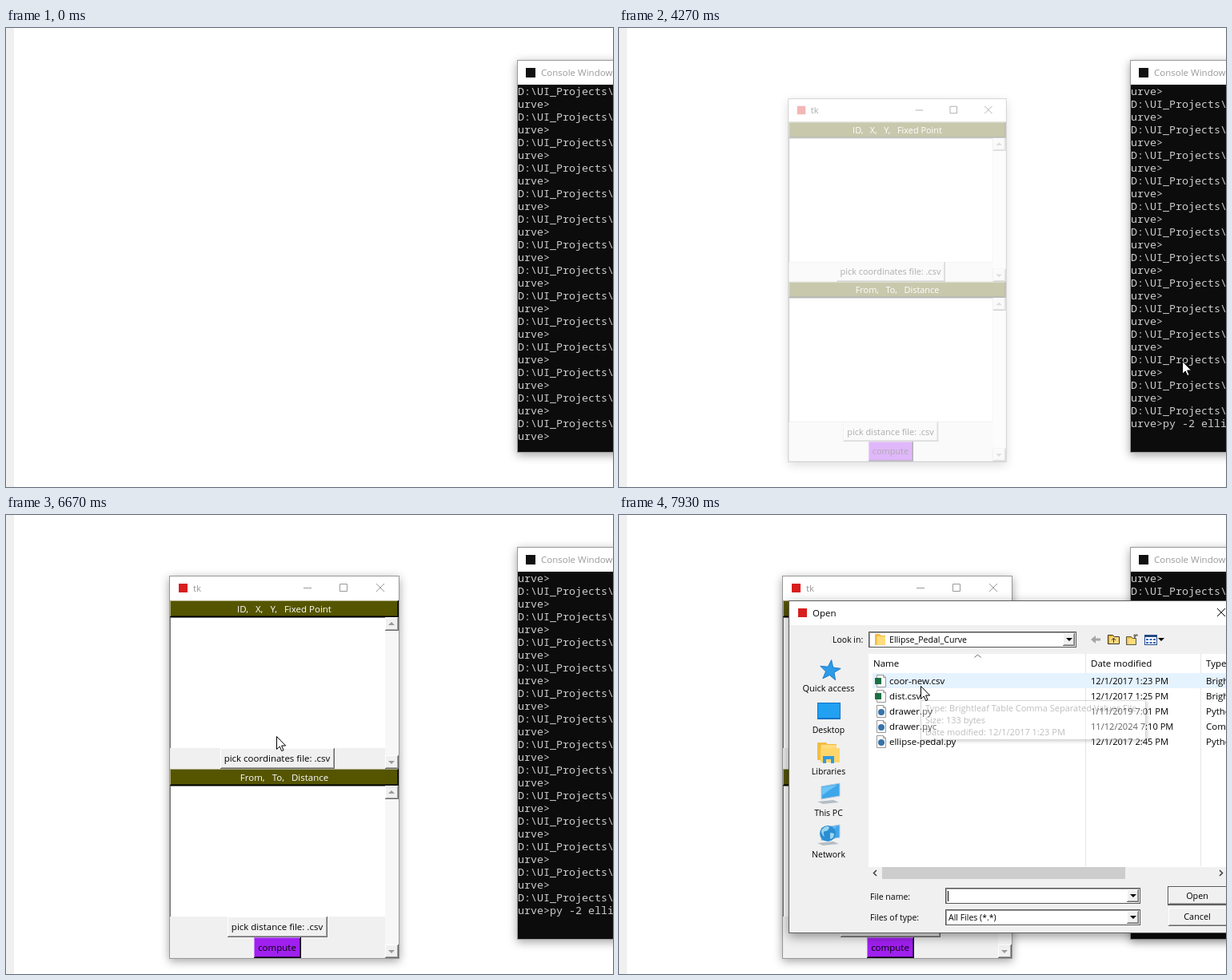
Animation of 759x575 px, one loop 8000 ms. Source, as an HTML page:

```html
<!DOCTYPE html>
<html lang="en">
<head>
<meta charset="utf-8">
<title>Opening a file from a small tool window</title>
<style>
html, body { margin: 0; width: 100%; height: 100%; overflow: hidden; background: #fff; }
svg { display: block; }
text { font-family: "Open Sans", "Noto Sans", sans-serif; white-space: pre; }
.mono text { font-family: "Noto Sans Mono", "DejaVu Sans Mono", monospace; }
.frame { fill: #999; filter: drop-shadow(0 3px 6px rgba(0,0,0,.36)); }
.on .frame { fill: #606060; filter: drop-shadow(0 4px 7px rgba(0,0,0,.42)); }
.bar { color: #999; }
.on .bar { color: #000; }
</style>
</head>
<body>
<svg id="stage" width="759" height="575" viewBox="0 0 759 575"></svg>
<script>
const LOOP = 8000, STEP = 1000 / 15;

// ---- drawing helpers ----
const rect = (x, y, w, h, fill, more = '') =>
  `<rect x="${x}" y="${y}" width="${w}" height="${h}" fill="${fill}" ${more}/>`;
const text = (x, y, s, size = 11.5, more = '') =>
  `<text x="${x}" y="${y}" font-size="${size}" ${more}>${s.replace(/>/g, '&gt;')}</text>`;
const mid = (x, y, s, size, more = '') => text(x, y, s, size, 'text-anchor="middle" ' + more);
const path = (d, fill = 'none', stroke = 'none', more = '') =>
  `<path d="${d}" fill="${fill}" stroke="${stroke}" ${more}/>`;
const group = (id, body, more = '') => `<g id="${id}" ${more}>${body}</g>`;
const down = (x, y, fill, r = 4) => path(`M${x - r} ${y - r / 2}h${2 * r}l${-r} ${r}z`, fill);
const up = (x, y, fill, r = 4) => path(`M${x - r} ${y + r / 2}h${2 * r}l${-r} ${-r}z`, fill);

function bevel(x, y, w, h, fill, light = '#fff', dark = '#696969') {
  return rect(x, y, w, h, dark) + rect(x, y, w - 1, h - 1, light) +
    rect(x + 1, y + 1, w - 2, h - 2, fill) +
    path(`M${x + 1} ${y + h - 1.5}H${x + w - 1.5}V${y + 1}`, 'none', dark, 'opacity=".55"');
}
function titleButtons(x, y) {
  return path(`M${x} ${y + .5}h10M${x + 45.5} ${y - 4.5}h9v9h-9z` +
    `M${x + 91} ${y - 5}l10 10m0 -10l-10 10`, 'none', 'currentColor');
}

// ---- console ----
const prompts = Array.from({length: 28}, (_, i) =>
  text(640, 84 + 16 * i, i % 2 ? 'urve>' : 'D:\\UI_Projects\\', 13.33)).join('');
const consoleWin =
  rect(639, 40, 500, 492, '', 'class="frame"') + rect(640, 71, 499, 460, '#0c0c0c') +
  group('lines', prompts + group('command', text(680, 516, 'py -2 ellipse', 13.33)),
    'class="mono" fill="#ccc"') +
  rect(640, 41, 499, 30, '#fff') + rect(650, 50, 12, 12, '#111') +
  text(669, 60, 'Console Window', 11.5, 'class="bar" fill="currentColor"') +
  rect(640, 515, 8, 4, '#f2f2f2', 'id="block"');

// ---- tool window ----
const scrollbar = (y, h) => rect(474, y, 17, h, '#f7f7f7') +
  bevel(474, y, 17, 17, '#f0f0f0') + up(482, y + 8, '#999') +
  bevel(474, y + h - 17, 17, 17, '#f0f0f0') + down(482, y + h - 8, '#999');
const heading = (y, x, s) => bevel(205, y, 286, 21, '#550', '#aaaa7f', '#000') +
  mid(x, y + 15, s, 11.5, 'fill="#fff"');
const textBox = y => rect(205, y, 269, 164, '#777') + rect(206, y + 1, 268, 163, '#fff');
const toolWin =
  rect(204, 76, 288, 480, '', 'class="frame"') + rect(205, 77, 286, 478, '#f0f0f0') +
  rect(205, 77, 286, 30, '#fff') + rect(216, 86, 11, 11, '#d81e1e') +
  `<g class="bar">${text(234, 96, 'tk', 11.5, 'fill="currentColor"')}${titleButtons(372, 91)}</g>` +
  textBox(128) + scrollbar(128, 190) + textBox(339) + scrollbar(339, 216) +
  heading(107, 348, 'ID,   X,   Y,   Fixed Point') + heading(318, 348, 'From,   To,   Distance') +
  bevel(268, 292, 143, 26, '#f0f0f0') +
  path('M268.5 317V292.5H410', 'none', '#696969', 'id="pressed"') +
  mid(339, 309, 'pick coordinates file: .csv') +
  bevel(277, 503, 125, 26, '#f0f0f0') + mid(339, 520, 'pick distance file: .csv') +
  bevel(310, 529, 59, 26, '#a020f0', '#c980f8', '#000') + mid(339, 546, 'compute');

// ---- open dialog ----
const files = [
  ['coor-new.csv', '12/1/2017 1:23 PM', 'Brightleaf Table', 'table'],
  ['dist.csv', '12/1/2017 1:25 PM', 'Brightleaf Table', 'table'],
  ['drawer.py', '1/11/2019 7:01 PM', 'Python File', 'code'],
  ['drawer.pyc', '11/12/2024 7:10 PM', 'Compiled Python File', 'code'],
  ['ellipse-pedal.py', '12/1/2017 2:45 PM', 'Python File', 'code']
];
const fileRow = ([name, date, type, kind], i) => {
  const y = 208 + 19 * i;
  const mark = kind == 'table' ? rect(320, y - 4, 8, 8, '#1d7044')
    : `<circle cx="328" cy="${y + 1}" r="4" fill="#3873a8"/>`;
  return path(`M322.5 ${y - 7.5}h8l3 3v12h-11z`, '#fff', '#999') +
    path(`M330.5 ${y - 7.5}v3h3`, 'none', '#999') +
    `<g class="${i == 1 ? '' : 'late'}">${mark}</g>` +
    text(338, y + 4, name) + text(590, y + 4, date, 11.1) + text(734, y + 4, type);
};
const combo = (y, x, w) => rect(x + .5, y + .5, w - 1, 19, '#fff', 'stroke="#555"') +
  path(`M${x + 1.5} ${y + 19}v-17.5h${w - 3}`, 'none', '#a0a0a0') +
  bevel(x + w - 17, y + 2, 15, 16, '#f0f0f0') + down(x + w - 9, y + 10, '#000');
const folder = (x, y, w, h) => path(`M${x} ${y}h${w * .45}l2 2h${w * .55 - 2}v${h - 2}h${-w}z`, '#f2bd42') +
  rect(x + w * .2, y + 3, w * .8, h - 3, '#ffdc7c');
const star = Array.from({length: 10}, (_, i) => {
  const a = Math.PI * (i / 5 - .5) + .12, r = i % 2 ? 5.5 : 13.5;
  return (264 + r * Math.cos(a)).toFixed(1) + ' ' + (195 + r * Math.sin(a)).toFixed(1);
}).join('L');
const pc = (x, y) => path(`M${x} ${y + 3}l23 -4v16l-23 4z`, '#3fa6ea', '#bcd') +
  path(`M${x + 1} ${y + 4}l19 -3l-19 13z`, '#6cc4f7') +
  path(`M${x - 5} ${y + 22}l20 -2l7 3l-20 2z`, '#b4bcc4');
const places =
  path(`M${star}z`, '#2e9be8', '#1b7cc8') + mid(262, 221, 'Quick access', 11) +
  rect(248, 235, 29, 21, '#1273c4') + rect(249, 236, 27, 18, '#22a0f2') + mid(262, 273, 'Desktop', 10.5) +
  folder(248, 285, 24, 22) + rect(252, 292, 24, 18, '#ffd66b') +
  path('M255 311v-9h14v9h-4v-5h-6v5z', '#2f9bdd') + mid(262, 325, 'Libraries', 10.5) +
  pc(253, 337) + mid(262, 377, 'This PC', 10.5) +
  pc(253, 389) + '<circle cx="261" cy="399" r="10" fill="#2b8ed2"/>' +
  path('M253 395q5 -7 10 -4q-1 5 -5 5t-1 7q-4 -2 -4 -8zM264 398l5 1q0 6 -5 7z', '#9bd6ef') +
  mid(262, 429, 'Network', 10.5);
const tools =
  path('M590 156l6 -5v3.5h6v3h-6v3.5z', '#a5a5a5') +
  folder(611, 150, 14, 12) + path('M611.5 150.5h6l2 2h6v9h-14zM618.5 160v-5m-2.5 2l2.5 -3l2.5 3', 'none', '#333') +
  folder(634, 152, 13, 11) + path('M634.5 152.5h6l2 2h4v8h-12zM645 149v5m-2 -3h6m-5 3l4 -5', 'none', '#554') +
  rect(657, 150, 16, 13, '#234a86') + rect(658, 153, 14, 9, '#fff') +
  [0, 1, 2].map(i => [155, 159].map(y => rect(659 + 4.5 * i, y, 3, 2, '#2f66b5')).join('')).join('') +
  down(678, 156, '#000');
const dialog =
  rect(212, 107, 565, 417, '', 'class="frame"') + rect(213, 108, 563, 415, '#f0f0f0') +
  rect(213, 108, 563, 30, '#fff') + rect(224, 117, 11, 11, '#d81e1e') + text(242, 127, 'Open') +
  path('M748 117l10 10m0 -10l-10 10', 'none', '#000') +
  text(267, 160, 'Look in:', 10.5) + combo(146, 312, 260) + folder(320, 149, 13, 14) +
  text(338, 160, 'Ellipse_Pedal_Curve', 10.6) + tools + places +
  rect(312, 174, 464, 283, '#fff') + rect(583, 174, 1, 266, '#e5e5e5') + rect(727, 174, 1, 266, '#e5e5e5') +
  path('M444.5 178.5l4 -3.5l4 3.5', 'none', '#666') +
  text(318, 190, 'Name') + text(590, 190, 'Date modified') + text(734, 190, 'Type') +
  rect(317, 198, 459, 19, '#e5f3ff', 'id="hover"') + files.map(fileRow).join('') +
  rect(312, 441, 464, 16, '#f0f0f0') + rect(329, 441, 304, 15, '#cdcdcd') +
  path('M322 445l-3.5 3.5l3.5 3.5M751 445l3.5 3.5l-3.5 3.5', 'none', '#444', 'stroke-width="1.6"') +
  text(314, 482, 'File name:', 10.5) + combo(467, 408, 244) +
  text(314, 508, 'Files of type:', 10.5) + combo(494, 408, 244) + text(412, 508, 'All Files (*.*)', 10.5) +
  rect(411, 471, 1, 13, '#000', 'id="caret"') +
  rect(686, 465, 78, 24, '#555') + bevel(687, 466, 76, 22, '#f0f0f0') + mid(723, 481, 'Open', 10.8) +
  bevel(687, 492, 76, 23, '#f0f0f0') + mid(723, 507, 'Cancel', 10.8);

const tip = rect(377, 232, 282, 50, '#999', 'style="filter:drop-shadow(2px 2px 2px rgba(0,0,0,.4))"') +
  rect(378, 233, 280, 48, '#fff') +
  ['Type: Brightleaf Table Comma Separated Values File', 'Size: 133 bytes',
    'Date modified: 12/1/2017 1:23 PM'].map((s, i) => text(383, 246 + 15 * i, s, 11, 'fill="#575757"')).join('');

document.getElementById('stage').innerHTML =
  rect(0, 0, 759, 575, '#fff') + rect(0, 0, 10, 575, '#f0f0f0') +
  group('console', consoleWin) + group('tool', toolWin) +
  group('dialog', dialog, 'class="on"') + group('tip', tip) +
  path('M.5 .5v16l3.7 -3.5l2.5 5.6l2.4 -1l-2.5 -5.6h5.1z', '#fff', '#000', 'id="mouse"');

// ---- motion ----
const $ = id => document.getElementById(id);
const show = (id, yes) => $(id).style.display = yes ? '' : 'none';
const within = (t, a, b) => t >= a - 1 && t < b - 1;
const ease = p => 1 - (1 - Math.min(1, Math.max(0, p))) ** 3;

// time, x, y
const enter = [[133, 745, 262], [200, 708, 290], [267, 685, 325], [333, 715, 372], [400, 760, 379]];
const main = [[3867, 746, 433], [3933, 722, 409], [4000, 704, 417], [5200, 704, 417], [5467, 560, 250],
  [5667, 380, 167], [5800, 255, 210], [5867, 247, 235], [6000, 320, 300], [6133, 330, 303],
  [6533, 330, 303], [6667, 338, 277], [6933, 370, 245], [7333, 375, 215], [7533, 375, 215], [7667, 377, 214]];

function along(keys, t) {
  const i = keys.findIndex(k => k[0] > t);
  if (i < 1) return keys.at(i).slice(1);
  const [a, x, y] = keys[i - 1], [b, u, v] = keys[i], p = (t - a) / (b - a);
  return [Math.round(x + (u - x) * p), Math.round(y + (v - y) * p)];
}
function grow(id, q, cx, cy) {
  const s = .9 + .1 * q;
  show(id, q > 0);
  $(id).setAttribute('opacity', q ** 1.6);
  $(id).setAttribute('transform', `translate(${cx * (1 - s)} ${cy * (1 - s)}) scale(${s})`);
}

function draw(time) {
  const t = Math.floor((time % LOOP + 4) / STEP) * STEP;

  $('console').classList.toggle('on', within(t, 600, 4267));
  $('lines').setAttribute('transform', `translate(0 ${t > 2932 ? -16 : 0})`);
  show('command', t > 1332);
  show('block', within(t, 1133, 1333) || within(t, 2933, 3200) || within(t, 3733, 4267));
  $('block').setAttribute('x', t < 2000 ? 680 : 640);

  grow('tool', ease((t - 4200) / 333), 348, 316);
  $('tool').classList.toggle('on', t < 6332);
  show('pressed', within(t, 6133, 6267));

  grow('dialog', ease((t - 6667) / 400), 494, 315);
  document.querySelectorAll('.late').forEach(e => e.style.display = t > 6999 ? '' : 'none');
  show('caret', Math.floor((t - 6799) / 533.3) % 2 == 0);

  const [x, y] = along(t < 2000 ? enter : main, t);
  show('mouse', within(t, 133, 400) || t > 3866);
  $('mouse').setAttribute('transform', `translate(${x} ${y})`);
  const row = Math.floor((y - 198) / 19);
  show('hover', row >= 0 && row < files.length);
  $('hover').setAttribute('y', 198 + 19 * row);

  show('tip', t > 7866);
  $('tip').setAttribute('opacity', t > 7932 ? .38 : .16);
}

const start = performance.now();
function tick() {
  draw(performance.now() - start);
  requestAnimationFrame(tick);
}
tick();
</script>
</body>
</html>
```
